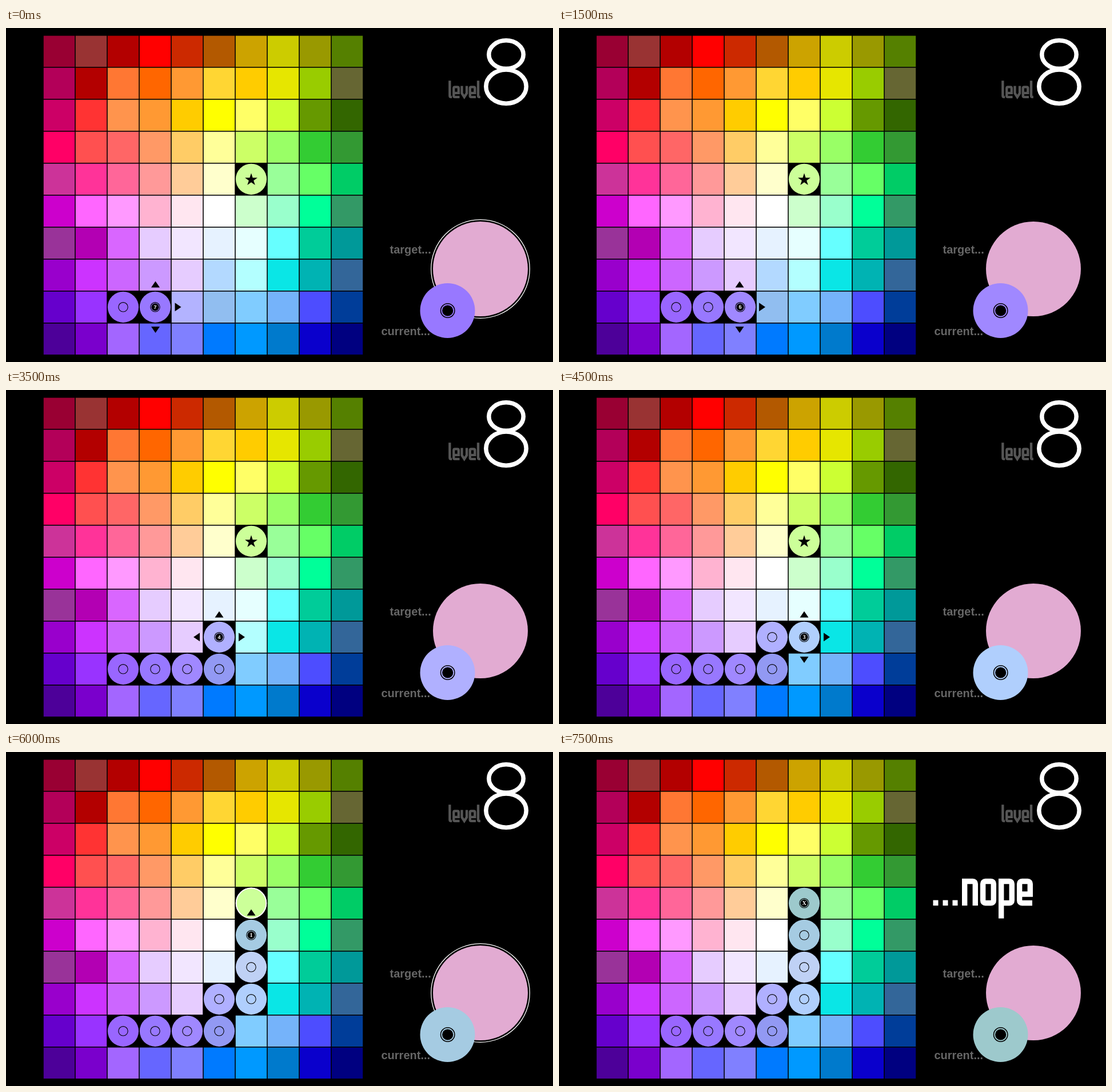
An HTML page with a canvas for the animation above (8 s loop, 957 px wide and 585 px high).

```html
<!DOCTYPE html>
<html lang="en">
<head>
<meta charset="utf-8">
<title>Colour path, level 8</title>
<style>
html, body { margin: 0; width: 100%; height: 100%; overflow: hidden; background: #000; }
canvas { display: block; }
</style>
</head>
<body>
<canvas id="stage" width="957" height="585" aria-label="level 8"></canvas>
<script>
const ctx = document.getElementById('stage').getContext('2d');
const LOOP = 8000, BLINK = 500, STEP = 1000;
const X0 = 65.8, Y0 = 13.6, PITCH = 56, SIZE = 54.4;

const board = [
  '990033 993333 b30000 ff0000 cc2900 b35900 cca300 cccc00 999900 558000',
  'b30059 b30000 ff7733 ff6600 ff9933 ffd633 ffcc00 e6e600 99cc00 666633',
  'cc0066 ff3333 ff944d ff9933 ffcc00 ffff00 ffff66 ccff33 669900 336600',
  'ff0066 ff5050 ff6666 ff9966 ffcc66 ffff99 ccff66 99ff66 33cc33 339933',
  'cc3399 ff3399 ff6699 ff9999 ffcc99 ffffcc ccff99 99ff99 66ff66 00cc66',
  'cc00cc ff66ff ff99ff ffb3d1 ffe6f0 ffffff ccffcc 99ffcc 00ff99 339966',
  '993399 b300b3 d966ff e6ccff f2e6ff e6f2ff e6ffff 66ffff 00cc99 009999',
  '9900cc cc33ff cc66ff cc99ff e6ccff b3d9ff b3ffff 0ae6e6 00b3b3 336699',
  '6600cc 9933ff 9966ff 9980ff b3b3ff 91bef0 80ccff 75b3fa 4d4dff 003d99',
  '4d0099 7a00cc a366ff 6666ff 8080ff 007aff 0099ff 007acc 0a00cc 000080'
].map(row => row.split(' ').map(c => '#' + c));

// Visited cells in order: column, row, mixed colour
const path = [
  [2, 8, '#9966ff'], [3, 8, '#9878ff'], [4, 8, '#a088ff'],
  [5, 8, '#9299f3'], [5, 7, '#b0b0ff'], [6, 7, '#b0cffd'],
  [6, 6, '#bfd1f5'], [6, 5, '#a5cbe2'], [6, 4, '#9dc9cc']
];
const goal = { col: 6, row: 4 };

const SERIF = 'bold 10px "Liberation Serif", serif';
const SANS = 'bold 9px "Liberation Sans", sans-serif';
const steps = [
  { mark: '7', font: SANS, arrows: 'urd', shift: 0.5 },
  { mark: '6', font: SERIF, arrows: 'urd', shift: -1 },
  { mark: '5', font: SERIF, arrows: 'urd', shift: -2.5 },
  { mark: '4', font: SANS, arrows: 'ulr', shift: 0 },
  { mark: '3', font: SERIF, arrows: 'urd', shift: 0 },
  { mark: '2', font: SERIF, arrows: 'ulr', shift: 0 },
  { mark: '1', font: SERIF, arrows: 'u', shift: 0 },
  { mark: 'X', font: SERIF, arrows: '', shift: 0 }
];
const directions = { u: [0, -1], r: [1, 0], d: [0, 1], l: [-1, 0] };

// Condensed display lettering: outline and advance
const glyphs = {
  n: ['M4.7 0V-42.5H19Q23.3 -42.5 23.3 -38V0', 32],
  o: ['M9 -42.5H19Q23.3 -42.5 23.3 -38V-9Q23.3 -4.5 19 -4.5H9Q4.7 -4.5 4.7 -9V-38Q4.7 -42.5 9 -42.5Z', 32],
  p: ['M4.7 22.5V-42.5H19Q23.3 -42.5 23.3 -38V-9Q23.3 -4.5 19 -4.5H4.7', 32],
  e: ['M27 -4.5H9Q4.7 -4.5 4.7 -9V-38Q4.7 -42.5 9 -42.5H19Q23.3 -42.5 23.3 -38V-20H4.7', 31],
  v: ['M4.7 -47V-19L14 -4.5L23.3 -19V-47', 31],
  l: ['M4.7 -67V-9Q4.7 -4.5 9 -4.5H13', 15]
};

function disc(x, y, r, fill) {
  ctx.beginPath();
  ctx.arc(x, y, r, 0, Math.PI * 2);
  ctx.fillStyle = fill;
  ctx.fill();
}

function ring(x, y, r, width, colour, ry = r) {
  ctx.beginPath();
  ctx.ellipse(x, y, r, ry, 0, 0, Math.PI * 2);
  ctx.lineWidth = width;
  ctx.strokeStyle = colour;
  ctx.stroke();
}

function polygon(points, fill) {
  ctx.beginPath();
  points.forEach(p => ctx.lineTo(p[0], p[1]));
  ctx.closePath();
  ctx.fillStyle = fill;
  ctx.fill();
}

function star(x, y, r) {
  polygon(Array.from({ length: 10 }, (_, i) => {
    const a = i * Math.PI / 5 - Math.PI / 2, d = i % 2 ? r * 0.382 : r;
    return [x + d * Math.cos(a), y + d * Math.sin(a)];
  }), '#000');
}

function arrow(x, y, dir) {
  const [dx, dy] = directions[dir];
  polygon([
    [x + dx * 5.5, y + dy * 5.5],
    [x - dx * 5.5 - dy * 7.5, y - dy * 5.5 + dx * 7.5],
    [x - dx * 5.5 + dy * 7.5, y - dy * 5.5 - dx * 7.5]
  ], '#000');
}

function lettering(word, x, y, scale, colour) {
  ctx.save();
  ctx.translate(x, y);
  ctx.scale(scale, scale);
  ctx.lineWidth = 9.4;
  ctx.strokeStyle = colour;
  for (const c of word) {
    const [outline, advance] = glyphs[c];
    ctx.stroke(new Path2D(outline));
    ctx.translate(advance, 0);
  }
  ctx.restore();
}

function label(text, x, y) {
  ctx.font = 'bold 20px "Liberation Sans", Arial, sans-serif';
  ctx.textAlign = 'left';
  ctx.fillStyle = '#666';
  ctx.fillText(text, x, y);
}

const centre = (col, row) => [X0 + col * PITCH + 27.2, Y0 + row * PITCH + 27.2];

function drawBoard(index) {
  const visited = path.slice(0, index + 1);
  board.forEach((colours, row) => colours.forEach((colour, col) => {
    const isGoal = col === goal.col && row === goal.row;
    if (isGoal || visited.some(p => p[0] === col && p[1] === row)) return;
    ctx.fillStyle = colour;
    ctx.fillRect(X0 + col * PITCH, Y0 + row * PITCH, SIZE, SIZE);
  }));
}

function drawPath(index, step) {
  for (let i = 0; i <= index; i++) {
    const [col, row, colour] = path[i];
    const [x, y] = centre(col, row);
    disc(x, y, 27.1, colour);
    ring(x, y, 8.2, 1.1, '#000');
    if (i < index) continue;
    disc(x, y, 6.6, '#000');
    ctx.font = step.font;
    ctx.textAlign = 'center';
    ctx.fillStyle = '#fff';
    ctx.fillText(step.mark, x, y + 3.3);
  }
}

function drawGoal(index) {
  if (index === path.length - 1) return;
  const [x, y] = centre(goal.col, goal.row);
  disc(x, y, 27.1, '#ccff99');
  if (index === path.length - 2) ring(x, y, 26.3, 2, '#fff');
  else star(x, y + 1, 11.5);
}

function drawArrows(index, step) {
  const [x, y] = centre(path[index][0], path[index][1]);
  for (const dir of step.arrows) {
    const [dx, dy] = directions[dir];
    arrow(x + dx * 39.5 + step.shift, y + dy * 39.7, dir);
  }
}

function drawPanel(colour, lit, lost) {
  lettering('level', 774.2, 123, 0.46, '#555');
  ring(875, 46.6, 30.2, 7.6, '#fff', 24.8);
  ring(875, 102.6, 35.2, 7.6, '#fff', 29.6);
  if (lost) {
    ctx.fillStyle = '#fff';
    for (let i = 0; i < 3; i++) ctx.fillRect(654.5 + i * 17, 259.5, 9, 9.5);
    lettering('nope', 705, 269, 1, '#fff');
  }
  if (lit) ring(830, 422, 86.3, 1.3, '#fff');
  disc(830, 422, 83, '#e2abd2');
  disc(772.5, 495, 48, colour);
  ring(772.7, 495, 12.2, 1.5, '#000');
  disc(772.7, 495, 9.6, '#000');
  label('target...', 671.5, 395);
  label('current...', 656.5, 538);
}

function draw(time) {
  const t = time % LOOP;
  const stage = Math.floor(t / STEP);
  const index = stage + 1, step = steps[stage];
  const lit = Math.floor(t / BLINK) % 2 === 0;
  ctx.fillStyle = '#000';
  ctx.fillRect(0, 0, 957, 585);
  drawBoard(index);
  drawGoal(index);
  drawPath(index, step);
  drawArrows(index, step);
  drawPanel(path[index][2], lit, index === path.length - 1);
}

let start;
function tick(now) {
  start ??= now;
  draw(Math.max(0, now - start));
  requestAnimationFrame(tick);
}
draw(0);
requestAnimationFrame(tick);
</script>
</body>
</html>
```
